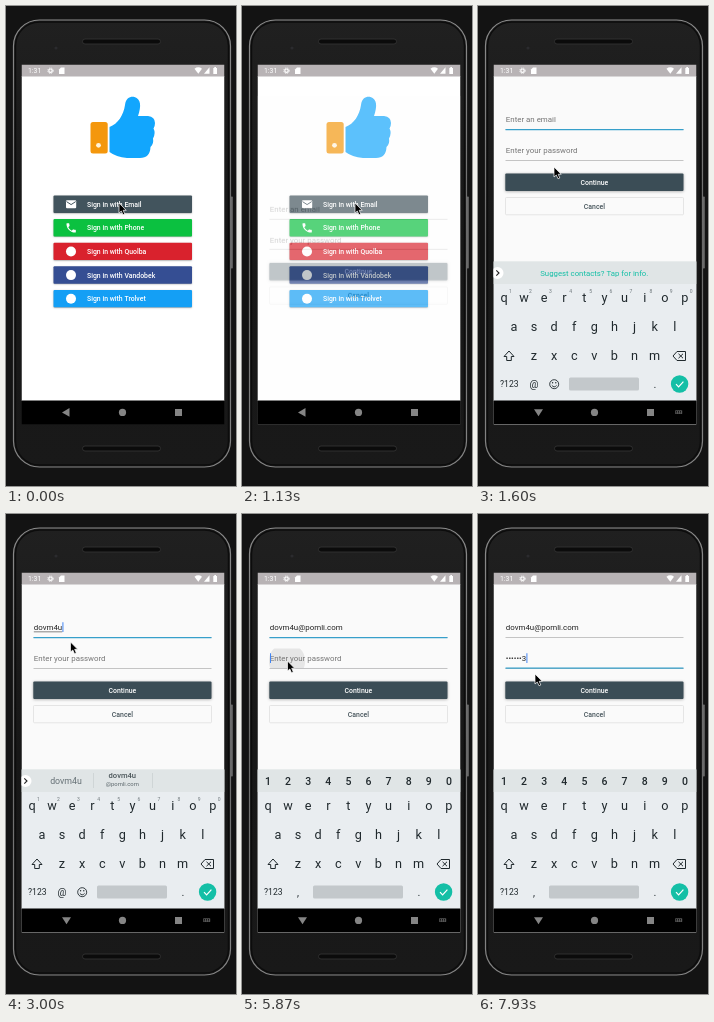
Recreate the animation shown at these times as an HTML page with a canvas. Size 230 by 480 pixels, loop 8 s.

```html
<!DOCTYPE html>
<html lang="en">
<head>
<meta charset="utf-8">
<title>Sign in</title>
<style>
  html, body { margin: 0; width: 100%; height: 100%; overflow: hidden; background: #131313; }
  canvas { display: block; width: 230px; height: 480px; }
</style>
</head>
<body>
<canvas id="stage"></canvas>
<script>
const W = 230, H = 480, LOOP = 8000;
const scale = window.devicePixelRatio || 1;
const setUp = canvas => {
  canvas.width = W * scale;
  canvas.height = H * scale;
  const c = canvas.getContext('2d');
  c.scale(scale, scale);
  return c;
};
const stage = setUp(document.getElementById('stage'));
const layer = setUp(document.createElement('canvas'));
let g = stage;

const TEAL = '#14bfa6', SLATE = '#3b4d56', BLUE = '#369fca', KEY = '#20292d';
const LEFT = 15.5, TOP = 58.5, WIDTH = 203, NAV = 394.5;
const USER = 'dovm4u', DOMAIN = '@pomli.com', EMAIL = USER + DOMAIN, PASSWORD = 'test123';
const EMAIL_KEYS = [2000, 2200, 2400, 2600, 2870, 3000, 3330, 3670, 3800, 3930, 4130, 4270, 4470, 4730, 4800, 5000];
const PASSWORD_KEYS = [6800, 7000, 7200, 7330, 7530, 7670, 7870];
const OPEN = 980, KEYBOARD = 1340, TAP = 5800;

// Mouse rests at each point until the next start time.
const MOUSE = [
  [0, 0, 113, 197], [1330, 1560, 76, 161], [2000, 2200, 64.5, 128],
  [5200, 5530, 45.5, 147], [7860, 7930, 57, 160]
];

const clamp = v => Math.min(1, Math.max(0, v));
const progress = (t, start, length) => clamp((t - start) / length);
const mix = (a, b, k) => a + (b - a) * k;
const easeOut = k => 1 - (1 - k) ** 3;

function bezier(x1, y1, x2, y2) {
  const at = (a, b, s) => 3 * a * s * (1 - s) ** 2 + 3 * b * s * s * (1 - s) + s ** 3;
  return x => {
    let lo = 0, hi = 1;
    for (let i = 0; i < 20; i++) {
      const mid = (lo + hi) / 2;
      if (at(x1, x2, mid) < x) lo = mid; else hi = mid;
    }
    return at(y1, y2, lo);
  };
}
const easeIn = bezier(.42, 0, 1, 1), fastOutSlowIn = bezier(.4, 0, .2, 1);

function box(x, y, w, h, fill, r = 0, stroke, line = 1) {
  g.beginPath();
  g.roundRect(x, y, w, h, r);
  if (fill) { g.fillStyle = fill; g.fill(); }
  if (stroke) { g.strokeStyle = stroke; g.lineWidth = line; g.stroke(); }
}
function disc(x, y, r, fill) {
  g.beginPath();
  g.arc(x, y, r, 0, 7);
  g.fillStyle = fill;
  g.fill();
}
function shape(d, fill, stroke, line = 1) {
  const path = new Path2D(d);
  if (fill) { g.fillStyle = fill; g.fill(path); }
  if (stroke) { g.strokeStyle = stroke; g.lineWidth = line; g.stroke(path); }
}
function text(s, x, y, size, color, align = 'left', weight = 400) {
  g.font = `${weight} ${size}px Roboto, sans-serif`;
  g.textAlign = align;
  g.fillStyle = color;
  g.fillText(s, x, y + size * .35);
  return g.measureText(s).width;
}
function raised(x, y, w, h, fill, blur) {
  g.save();
  g.shadowColor = 'rgba(0,0,0,.35)';
  g.shadowBlur = blur * scale;
  g.shadowOffsetY = scale * .6;
  box(x, y, w, h, fill, 1);
  g.restore();
}
function vertical(...colors) {
  const fill = g.createLinearGradient(0, 14, 0, 461);
  colors.forEach((color, i) => fill.addColorStop(i / (colors.length - 1), color));
  return fill;
}

function drawPhone() {
  box(0, 0, W, H, '#131313');
  box(224.8, 190.5, 2, 72, '#6a6a6a', .8);
  box(7.5, 14, 217, 447, vertical('#202020', '#171717', '#191919'), 26, vertical('#8c8c8c', '#686868', '#858585'), 1.2);
  box(9.5, 16, 213, 443, null, 24, '#0c0c0c', 1.4);
  for (const y of [33, 440]) box(76.5, y, 78, 5, '#0b0b0b', 2.5, '#323232', .9);
  disc(50, 42, 1.6, '#2b2b2e');
}

function drawStatus() {
  box(LEFT, TOP, WIDTH, 12, '#b8b3b5');
  text('1:31', 22, 64.7, 6.9, '#fff');
  g.beginPath();
  g.setLineDash([1.1, 1.1]);
  g.arc(44.5, 64.7, 2.7, 0, 7);
  g.strokeStyle = '#fff';
  g.lineWidth = 1;
  g.stroke();
  g.setLineDash([]);
  g.beginPath();
  g.arc(44.5, 64.7, 1.7, 0, 7);
  g.lineWidth = 1.2;
  g.stroke();
  shape('M55 61.5H58.5V68H53V63.5Z', '#fff');
  shape('M188.5 62.7Q192.3 59.8 196 62.7L192.3 67.8Z', '#fff');
  shape('M203.5 61.3V67.8H198Z', '#fff');
  shape('M207.3 62H208.3V61H210V62H211V68H207.3Z', '#fff');
}

function drawNav(keyboardUp) {
  const grey = '#858585';
  box(LEFT, NAV, WIDTH, 24, '#000');
  shape(keyboardUp ? 'M56 403.2H65L60.5 410.3Z' : 'M63.5 402V410.8L56 406.4Z', grey);
  disc(116.5, 406.4, 3.6, grey);
  box(169, 403, 7, 7, grey);
  if (!keyboardUp) return;
  box(197.2, 404.3, 7, 3.8, '#555', .5);
  for (let i = 0; i < 6; i++) box(198 + i % 3 * 2, 405 + (i / 3 | 0) * 1.5, 1, .7, '#000');
}

function drawThumb() {
  box(84.5, 116, 17.2, 31.5, '#f4970d', 2.5);
  disc(92.5, 139.3, 2.4, '#fff3dc');
  shape('M103.5 121C112 118 117.5 109 119 99C120 92 124 90.3 128.5 91C135 93 135.5 100 132 110'
    + 'H142Q149 111 149 117Q149 120 147.5 122.5Q150 127 147 132.5Q148 138 144.5 141'
    + 'Q144 152 134 152H121Q110 151 103.5 146Z', '#12a6fd');
}

function drawLogin() {
  box(LEFT, 70, WIDTH, 325, '#fff');
  drawThumb();
  const rows = [['Email', '#42545d'], ['Phone', '#0bc140'], ['Quolba', '#d9222d'],
    ['Vandobek', '#354e93'], ['Trolvet', '#149ff5']];
  rows.forEach(([name, color], i) => {
    const y = 189.5 + i * 23.6, mid = y + 8.8;
    raised(47.5, y, 138.5, 17.4, color, 1.5);
    text('Sign in with ' + name, 81, mid, 6.9, '#fff', 'left', 500);
    if (i > 1) disc(65, mid, 5, '#fff');
  });
  box(60, 194.3, 10.2, 8, '#fff', 1);
  shape('M60.5 195.6L65.1 198.6L69.7 195.6', null, '#42545d', 1);
  g.save();
  g.translate(58.9, 215.6);
  g.scale(.52, .52);
  shape('M6.6 10.8C8 13.6 10.4 16 13.2 17.4L15.4 15.2Q16 14.7 16.5 15Q18 15.5 20 15.5Q21 15.5 21 16.5'
    + 'V20Q21 21 20 21C10.6 21 3 13.4 3 4Q3 3 4 3H7.5Q8.5 3 8.5 4Q8.5 6 9 7.6Q9.2 8 8.8 8.6Z', '#fff');
  g.restore();
}

function underline(y, focus) {
  box(27.5, y, 178, .6, '#909090');
  g.save();
  g.globalAlpha = focus;
  box(27.5, y - .5, 178, 1.2, BLUE);
  g.restore();
}

// Caret restarts its blink with every key press.
function caret(t, last, x, y) {
  if (Math.floor((t - last) / 500) % 2 === 0) box(x, y - 5, 1, 9.6, '#4285f4');
}

function drawField(t, value, hint, y, focused, last) {
  const width = text(value || hint, 27.8, y, 7.9, value ? '#222' : '#757575');
  if (focused) caret(t, last, 28 + (value ? width : 0), y);
  return width;
}

function drawForm(t, emailLength, passLength) {
  const passFocus = progress(t, TAP + 70, 130);
  const emailFocus = progress(t, KEYBOARD, 180) * (1 - passFocus);
  const onPassword = t >= TAP;
  box(LEFT, 70, WIDTH, 360, '#fafafa');
  g.save();
  g.translate(0, t < KEYBOARD ? 69.5 : 0);

  const ripple = progress(t, TAP, 200);
  if (ripple > 0 && ripple < 1) {
    g.save();
    g.beginPath();
    g.rect(27, 134.5, 179, 19.5);
    g.clip();
    disc(45, 147, 10 + 23 * ripple, `rgba(0,0,0,${.09 * (1 - ripple ** 2)})`);
    g.restore();
  }

  const width = drawField(t, EMAIL.slice(0, emailLength), 'Enter an email', 113.3,
    t >= KEYBOARD && !onPassword, EMAIL_KEYS[emailLength - 1] ?? 1060);
  if (emailLength && emailLength <= USER.length) box(27.8, 117.6, width, .6, '#333');
  const shown = passLength ? '•'.repeat(passLength - 1) + PASSWORD[passLength - 1] : '';
  drawField(t, shown, 'Enter your password', 144.3, onPassword, PASSWORD_KEYS[passLength - 1] ?? TAP);
  underline(123.5, emailFocus);
  underline(154, passFocus);

  raised(27.3, 167.5, 178.2, 17.5, SLATE, 3);
  text('Continue', 116.4, 176.3, 6.9, '#fff', 'center', 500);
  box(27.5, 191.5, 178, 17.3, '#fafafa', 1, '#dcdcdc', .7);
  text('Cancel', 116.4, 200.1, 6.9, '#45535a', 'center', 500);
  g.restore();
}

function drawSuggestions(t, length) {
  disc(19.5, 267, 6, '#fff');
  shape('M18.3 264.3L21 267L18.3 269.7', null, '#222', 1.1);
  if (!length) return text('Suggest contacts? Tap for info.', 116.3, 267, 7.8, TEAL, 'center');
  if (length > USER.length) return;
  text(USER.slice(0, length), 60, 267, 8.8, '#667176', 'center');
  for (const x of [87, 146]) box(x, 259, .6, 15, '#c3c9cc');
  if (t < 2600) return;
  text(USER, 116.3, 261.5, 7.6, '#4a5559', 'center', 500);
  text(DOMAIN, 116.3, 270.3, 5.9, '#5d686d', 'center');
}

function drawKeyboard(t, length) {
  const onPassword = t >= TAP + 30;
  box(LEFT, 255.5, WIDTH, 139.5, '#e9edf0');
  box(LEFT, 255.5, WIDTH, 22.5, '#e0e5e6');
  if (!onPassword) drawSuggestions(t, length);
  [...'1234567890'].forEach((digit, i) => {
    if (onPassword) text(digit, 26 + i * 20.1, 267.3, 10.5, KEY, 'center', 500);
    else text(digit, 32.3 + i * 20.1, 284.8, 5, '#6f787c', 'center');
  });
  [['qwertyuiop', 26], ['asdfghjkl', 36], ['zxcvbnm', 56]].forEach(([keys, x], row) =>
    [...keys].forEach((key, i) => text(key, x + i * 20.1, 291.3 + row * 29, 12.7, KEY, 'center')));

  shape('M31 345L36 350.5H33.3V354.5H28.7V350.5H26Z', null, KEY);
  shape('M199 345.5H207.5V354.5H199L195 350ZM200.5 347.8L205 352.2M205 347.8L200.5 352.2', null, KEY);
  text('?123', 31.3, 378.3, 8.6, KEY, 'center');
  text(onPassword ? ',' : '@', 56, 378, 10, KEY, 'center');
  if (!onPassword) {
    g.beginPath();
    g.arc(76.2, 378.2, 4.5, 0, 7);
    g.strokeStyle = KEY;
    g.lineWidth = .9;
    g.stroke();
    disc(74.6, 376.8, .7, KEY);
    disc(77.8, 376.8, .7, KEY);
    shape('M73.8 379.3Q76.2 382.4 78.6 379.3', null, KEY, .9);
  }
  const spaceX = onPassword ? 71 : 91;
  box(spaceX, 371.5, 161 - spaceX, 13, '#c3c8cb', 1.5);
  text('.', 177, 378, 11, KEY, 'center');
  disc(201.6, 378, 8.7, TEAL);
  shape('M198 378.2L200.6 380.8L205.4 375.6', null, '#fff', 1.2);
}

function drawMouse(t) {
  let [, , x, y] = MOUSE[0];
  for (const [start, end, nx, ny] of MOUSE.slice(1)) {
    const k = progress(t, start, end - start);
    x = mix(x, nx, k);
    y = mix(y, ny, k);
  }
  g.save();
  g.translate(x, y);
  shape('M0 0V10L2.3 8L4 11.8L5.8 11L4.2 7.3H7.2Z', '#000', '#fff', .7);
  g.restore();
}

function draw(t) {
  const typed = times => times.filter(at => at <= t).length;
  const emailLength = typed(EMAIL_KEYS);
  const keyboardUp = t >= KEYBOARD;
  const opening = progress(t, OPEN, 300);

  drawPhone();
  g.save();
  g.beginPath();
  g.rect(LEFT, TOP, WIDTH, 360);
  g.clip();
  if (opening < 1) drawLogin();
  if (opening > 0) {
    g = layer;
    g.clearRect(0, 0, W, H);
    drawForm(t, emailLength, typed(PASSWORD_KEYS));
    g = stage;
    g.globalAlpha = easeIn(opening);
    g.drawImage(layer.canvas, 0, 90 * (1 - fastOutSlowIn(opening)), W, H);
    g.globalAlpha = 1;
  }
  if (keyboardUp) {
    g.save();
    g.translate(0, 139 * (1 - easeOut(progress(t, KEYBOARD, 200))));
    drawKeyboard(t, emailLength);
    g.restore();
  }
  drawStatus();
  drawNav(keyboardUp);
  g.restore();
  drawMouse(t);
}

function tick() {
  draw(performance.now() % LOOP);
  requestAnimationFrame(tick);
}
tick();
</script>
</body>
</html>
```
